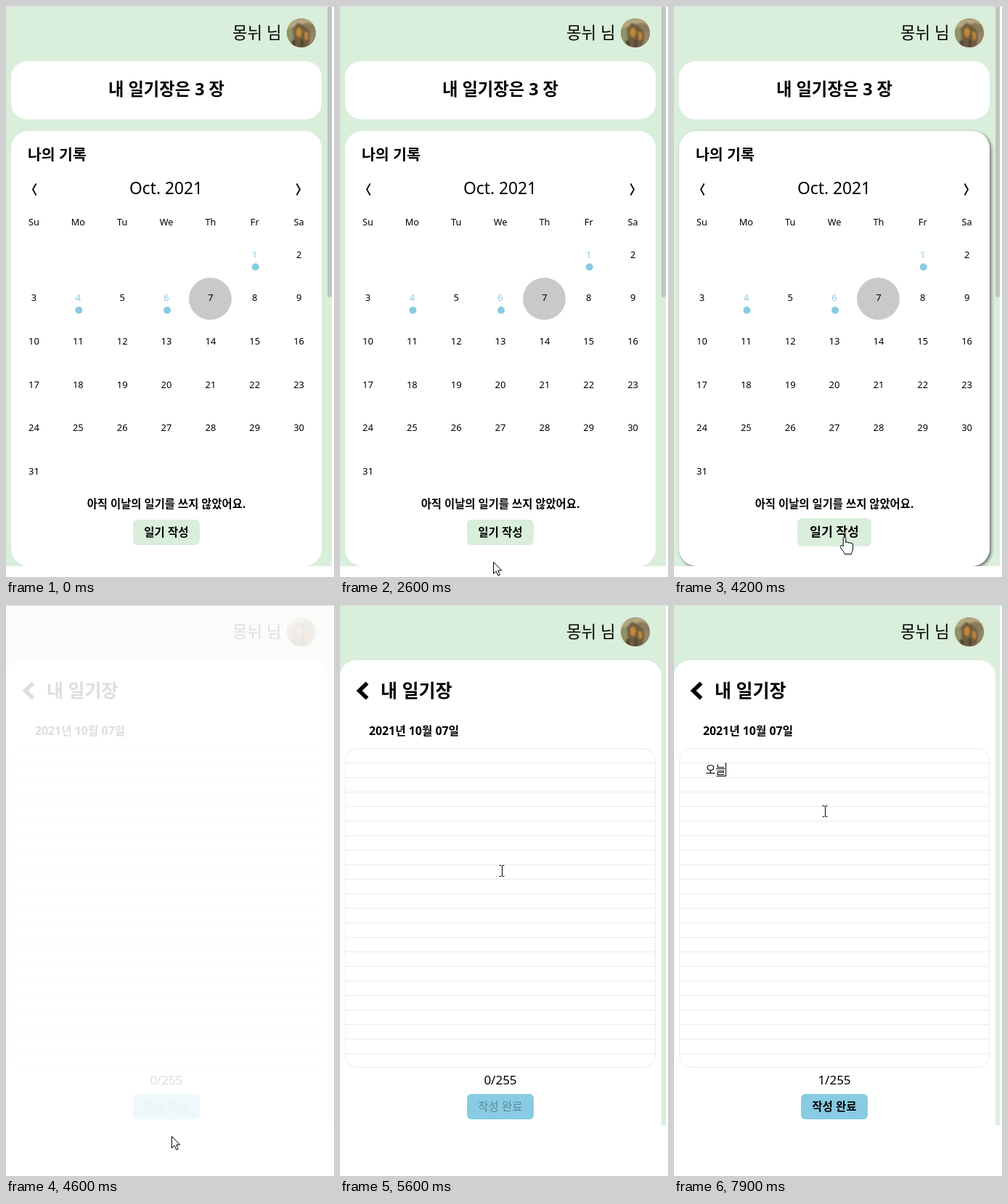
Write an HTML page that moves like this. It is 452 by 786 pixels and loops after 8 s.

```html
<!DOCTYPE html>
<html lang="ko">
<head>
<meta charset="utf-8">
<title>일기장</title>
<style>
  html, body { margin: 0; width: 100%; height: 100%; overflow: hidden; background: #fff; }
  svg { display: block; width: 452px; height: 786px; font-family: "Noto Sans", "Noto Sans CJK KR", "Noto Sans CJK", sans-serif; }
  .mid { text-anchor: middle; }
  .bold { font-weight: 600; }
  .day { font-size: 13px; }
  .week { font-size: 12.7px; font-weight: 500; }
  .line { fill: none; stroke: #000; }
</style>
</head>
<body>
<svg viewBox="0 0 452 786">
  <defs>
    <clipPath id="round"><circle cx="407" cy="37" r="20"/></clipPath>
    <filter id="blur"><feGaussianBlur stdDeviation="2"/></filter>
    <filter id="soft"><feGaussianBlur stdDeviation="1.3"/></filter>
    <g id="head">
      <text x="312" y="44.5" font-size="22.4">몽뉘 님</text>
      <g clip-path="url(#round)">
        <path d="M387 17h40v40h-40z" fill="#8b7b5c"/>
        <g filter="url(#soft)">
          <path d="M387 17h40v9l-12-3-12 4-16 5z" fill="#b3a77f"/>
          <path d="M387 34l7-4 3 27h-10z" fill="#8f9468"/>
          <path d="M396 30l6-7 7 3 8 7 3 12-5 12h-17z" fill="#705b40"/>
          <path d="M400 32l5-3 3 7-3 8-5-4zM411 35l5 2v9l-4 1z" fill="#c28a34"/>
          <path d="M394 47h5v10h-6zM406 46h4v11h-5z" fill="#4e4636"/>
          <path d="M419 38l8-4v23h-9z" fill="#958569"/>
        </g>
      </g>
    </g>
  </defs>

  <g id="home">
    <path d="M0 0h449v771H0z" fill="#d9eedb"/>
    <rect x="443" y="-4" width="6" height="405" rx="3" fill="#bcc6bd"/>
    <use href="#head"/>
    <rect x="7" y="76" width="428" height="80" rx="22" fill="#fff"/>
    <text class="mid bold" x="221" y="123" font-size="23.3">내 일기장은 3 장</text>
    <rect id="shadow" x="9" y="174" width="428" height="599" rx="24" fill="#000" filter="url(#blur)"/>
    <rect x="7" y="172" width="428" height="599" rx="24" fill="#fff"/>
    <path d="M0 771h452v15H0z" fill="#fff"/>
    <text class="bold" x="30" y="211.5" font-size="20.5">나의 기록</text>
    <text class="mid" x="220.5" y="259" font-size="22.8">Oct. 2021</text>
    <path class="line" d="M41.5 244.5L37 252.5l4.500 8M400.500 244.500l4.500 8-4.500 8" stroke-width="1.800"/>
    <ellipse cx="281.500" cy="403" rx="29.500" ry="29" fill="#c8c9c8"/>
    <g id="days"></g>
    <text class="mid bold" x="221" y="690.500" font-size="15.400">아직 이날의 일기를 쓰지 않았어요.</text>
    <g id="write">
      <rect x="175" y="707" width="92" height="35" rx="6" fill="#d9eedb"/>
      <text class="mid bold" x="221" y="729.500" font-size="15.600">일기 작성</text>
    </g>
  </g>

  <g id="diary">
    <path d="M0 0h449v716H0z" fill="#d9eedb"/>
    <path d="M0 716V98a22 22 0 0 1 22-22h399a22 22 0 0 1 22 22v618z" fill="#fff"/>
    <use href="#head"/>
    <path class="line" d="M37.500 107.500L26.500 118l11 10.500" stroke-width="5.500"/>
    <text class="bold" x="56" y="127" font-size="25">내 일기장</text>
    <text class="bold" x="40" y="179" font-size="15.800">2021년 10월 07일</text>
    <rect x="7.500" y="197.500" width="427" height="439" rx="16" fill="none" stroke="#ebebeb"/>
    <path id="rules" stroke="#ebebeb"/>
    <text id="entry" x="43.500" y="231.500" font-size="15"></text>
    <path id="compose" stroke="#000"/>
    <path id="caret" stroke="#000"/>
    <text id="count" class="mid" x="221" y="660" font-size="17"></text>
    <rect x="175" y="673" width="92" height="35" rx="6" fill="#88cbe2"/>
    <text id="done" class="mid" x="221" y="695.500" font-size="15.600">작성 완료</text>
  </g>

  <path d="M0 .5h452" stroke="#ddd"/>
  <g id="pointer">
    <path id="arrow" d="M.5.500v16l3.700-3.500 2.600 6 2.500-1.100-2.600-5.900h5z" fill="#fff" stroke="#000"/>
    <path id="hand" d="M-1.800 13V1.800a1.800 1.800 0 0 1 3.600 0V8c0-1.800 3.500-1.800 3.500.500 0-1.600 3.300-1.500 3.300.700 0-1.500 2.900-1.300 2.900.800v6c0 3-2 4.500-2 7.500H0c0-3-3.500-5-5.500-9.500-1.200-2.800 1.500-3.500 3.700-1z" fill="#fff" stroke="#000"/>
    <path id="beam" class="line" d="M-3.500-7.500h2.500l1 1 1-1h2.500M.5-6.500v13M-3.500 7.500h2.500l1-1 1 1h2.500"/>
  </g>
</svg>
<script>
const LOOP = 8000;
const $ = id => document.getElementById(id);
const clamp = v => Math.max(0, Math.min(1, v));
const ramp = (t, start, length) => clamp((t - start) / length);
const show = (id, on) => $(id).setAttribute('visibility', on ? 'inherit' : 'hidden');

// Calendar: the month starts on a Friday
const columnX = c => 38.5 + c * 60.85;
let cells = '';
['Su', 'Mo', 'Tu', 'We', 'Th', 'Fr', 'Sa'].forEach((name, c) => {
  cells += `<text class="mid week" x="${columnX(c)}" y="301.7">${name}</text>`;
});
for (let day = 1; day <= 31; day++) {
  const slot = day + 4, x = columnX(slot % 7), y = 346.7 + Math.floor(slot / 7) * 59.6;
  const marked = [1, 4, 6].includes(day);
  cells += `<text class="mid day" x="${x}" y="${y}" fill="${marked ? '#88cbe2' : '#000'}">${day}</text>`;
  if (marked) cells += `<circle cx="${x + 1}" cy="${y + 12.5}" r="5" fill="#88cbe2"/>`;
}
$('days').innerHTML = cells;

let rules = '';
for (let y = 217.5; y < 630; y += 20) rules += `M8 ${y}h426`;
$('rules').setAttribute('d', rules);

// Pointer stops: time, x, y
const path = [
  [700, 262, 747], [1000, 278, 370], [1300, 268, 470], [1800, 230, 711],
  [2300, 208, 790], [2450, 208, 788], [2600, 211, 765], [2800, 218, 748],
  [3100, 235, 731], [4200, 235, 731], [4400, 228, 731], [5000, 228, 731],
  [5600, 223, 366], [6100, 208, 284], [LOOP, 208, 284]
];
function pointerAt(t) {
  const i = Math.max(1, path.findIndex(p => p[0] > t));
  const [t0, x0, y0] = path[i - 1], [t1, x1, y1] = path[i];
  const k = ramp(t, t0, t1 - t0), e = k * k * (3 - 2 * k);
  return [x0 + (x1 - x0) * e, y0 + (y1 - y0) * e];
}

// Each keystroke replaces the syllable being composed
const keys = [[7100, 'ㅇ'], [7250, '오'], [7400, '온'], [7600, '오느'], [7750, '오늘']];

function draw(t) {
  const onDiary = t >= 4500;
  show('home', !onDiary);
  show('diary', onDiary);
  $('shadow').setAttribute('opacity', 0.55 * ramp(t, 2620, 300));
  const scale = 1 + 0.105 * ramp(t, 2950, 200);
  $('write').setAttribute('transform', `translate(221 724.500) scale(${scale}) translate(-221 -724.500)`);
  $('diary').setAttribute('opacity', ramp(t, 4500, 800));

  const typed = keys.filter(k => k[0] <= t);
  const text = typed.length ? typed[typed.length - 1][1] : '';
  const filled = typed.length > 1;
  const end = 43.5 + text.length * 14;
  $('entry').textContent = text;
  $('compose').setAttribute('d', text ? `M${end - 13} 235.500h13` : '');
  $('caret').setAttribute('d', `M${end} 217v19`);
  show('caret', onDiary && t >= 6250 && (text || (t - 6250) % 1060 < 530));
  $('count').textContent = (filled ? 1 : 0) + '/255';
  $('done').setAttribute('fill', filled ? '#000' : '#5c8999');
  $('done').setAttribute('font-weight', filled ? 600 : 400);

  const [x, y] = pointerAt(t);
  const hand = t >= 2950 && !onDiary, beam = onDiary && y < 636;
  show('pointer', t >= 700);
  $('pointer').setAttribute('transform', `translate(${Math.round(x)} ${Math.round(y)})`);
  show('arrow', !hand && !beam);
  show('hand', hand);
  show('beam', beam);
}

const start = performance.now();
function tick() {
  const t = (performance.now() - start) % LOOP;
  draw(Math.floor(t / 100) * 100);
  requestAnimationFrame(tick);
}
tick();
</script>
</body>
</html>
```
